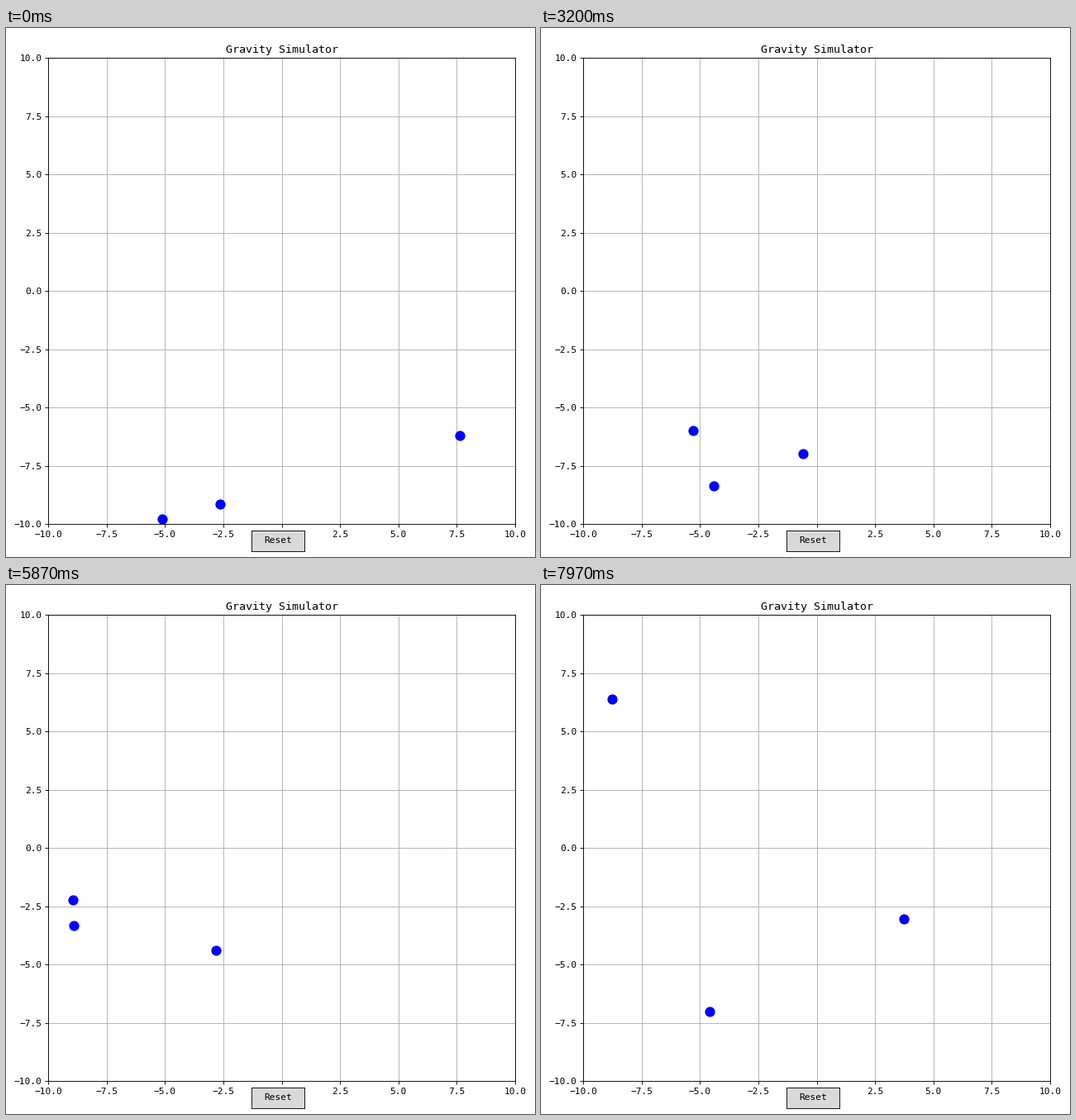
A matplotlib script for the animation above (8 s loop, 640 by 640 pixels).

```python
import numpy as np
import matplotlib.pyplot as plt
from matplotlib.animation import FuncAnimation

SIZE, DPI = 640, 80
LOOP, FRAMES = 8000, 240
LEFT, RIGHT, TOP, BOTTOM = 51, 616, 36.2, 600.4
WALL = 10

plt.rcParams.update({"font.family": "DejaVu Sans Mono", "toolbar": "None"})

# Moments of approach, swing-by and escape, with x, y of each body
TIMES = np.array([0, 1170, 2330, 3330, 4030, 5130, 6630, 7970])
ORBITS = np.array([
    [(-5.13, -9.8), (-4.83, -8.78), (-4.99, -6.61), (-4.3, -8.4),
     (-1.8, -7.92), (-1.91, -7.34), (-4.44, -0.07), (-8.76, 6.4)],
    [(-2.62, -9.17), (-4.6, -8.03), (-5.2, -6.76), (-5.3, -5.97),
     (-6.81, -6.06), (-7.75, -4.31), (-9.68, -2.78), (-4.57, -7.02)],
    [(7.66, -6.19), (5.36, -6.45), (2.42, -6.83), (-1.0, -6.97),
     (-4.02, -5.85), (-7.35, -3.23), (-9.73, -1.77), (3.72, -3.03)],
])


def velocities(pos):
    """Harmonic mean of neighbouring speeds, zero where a body turns back."""
    step = np.diff(pos, axis=0) / np.diff(TIMES)[:, None]
    before, after = step[:-1], step[1:]
    same_way = before * after > 0
    total = np.where(same_way, before + after, 1)
    mean = np.where(same_way, 2 * before * after / total, 0)
    return np.vstack([step[:1], mean, step[-1:]])


def glide(pos, t):
    """Cubic path through the key points, without overshoot."""
    vel = velocities(pos)
    k = np.clip(np.searchsorted(TIMES, t, side="right") - 1, 0, len(TIMES) - 2)
    span = (TIMES[k + 1] - TIMES[k])[:, None]
    u = np.clip((t - TIMES[k])[:, None] / span, 0, 1)
    ease = u * u * (3 - 2 * u)
    return (pos[k] * (1 - ease) + pos[k + 1] * ease
            + span * u * (1 - u) * (vel[k] * (1 - u) - vel[k + 1] * u))


# Sample inside each frame's span rather than at its start
clock = (np.arange(FRAMES) + 0.6) * LOOP / FRAMES
paths = np.stack([glide(orbit, clock) for orbit in ORBITS], axis=1)

fig = plt.figure(figsize=(SIZE / DPI, SIZE / DPI), dpi=DPI, facecolor="white")
ax = fig.add_axes([LEFT / SIZE, 1 - BOTTOM / SIZE,
                   (RIGHT - LEFT) / SIZE, (BOTTOM - TOP) / SIZE])
ticks = np.linspace(-WALL, WALL, 9)
ax.set(xlim=(-WALL, WALL), ylim=(-WALL, WALL), xticks=ticks, yticks=ticks)
ax.grid(True)
ax.set_title("Gravity Simulator", fontsize=12)
bodies = ax.scatter(*paths[0].T, s=100, color="blue", zorder=2)

button = fig.add_axes([0.464, 0.0105, 0.1, 0.04], facecolor="0.85")
button.set(xticks=[], yticks=[])
button.text(0.5, 0.5, "Reset", ha="center", va="center",
            transform=button.transAxes)


def update(i):
    bodies.set_offsets(paths[i])
    return (bodies,)


anim = FuncAnimation(fig, update, frames=FRAMES, interval=LOOP / FRAMES,
                     repeat=True, repeat_delay=0, blit=False)
plt.show()
```
